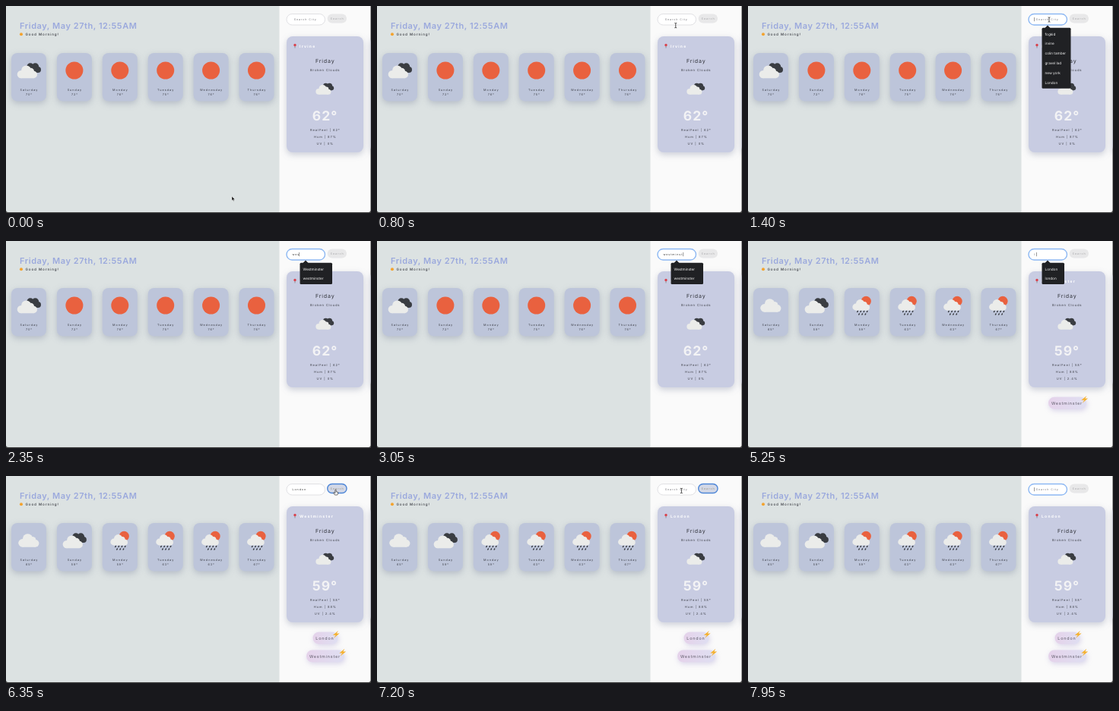
Animation of 480 by 273 pixels, one loop 8000 ms. Source, as an HTML page:

```html
<!DOCTYPE html>
<html lang="en">
<head>
<meta charset="utf-8">
<title>Weather dashboard</title>
<style>
  html, body { margin: 0; width: 100%; height: 100%; overflow: hidden; background: #3a3a3a; }
  svg { display: block; width: 100vw; height: 100vh; font-family: Inter, Arial, sans-serif; white-space: pre; }
  text { text-rendering: geometricPrecision; }
  .card { filter: drop-shadow(0 3px 4.5px rgba(70, 80, 120, .26)); }
  .pill { filter: drop-shadow(1px 2px 3.5px rgba(130, 110, 190, .28)); }
</style>
</head>
<body>
<svg viewBox="0 0 480 273">
  <defs>
    <linearGradient id="pillFill">
      <stop offset="0" stop-color="#e5d2ea"/><stop offset="1" stop-color="#dfdff2"/>
    </linearGradient>
    <clipPath id="window"><path d="M0 0H479.5V269a3 3 0 0 1-3 3H3a3 3 0 0 1-3-3z"/></clipPath>
    <g id="cloud">
      <circle cx="-8.8" cy="3.5" r="5.5"/><circle cx="-1.5" cy="-2" r="7"/>
      <circle cx="5" cy="-.5" r="4.8"/><circle cx="9" cy="4" r="5"/><path d="M-8.8 0H9V9H-8.8z"/>
    </g>
    <g id="sunny"><circle r="11.5" fill="#e9613f"/></g>
    <g id="cloudy"><use href="#cloud" transform="scale(.96)" fill="#ebecea"/></g>
    <g id="broken">
      <g fill="#3a3d42">
        <circle cx="2" cy="-5" r="4.7"/><circle cx="8.5" cy="-5" r="4.7"/>
        <circle cx="12" cy="-1" r="4"/><path d="M2-5H12V3H2z"/>
      </g>
      <use href="#cloud" transform="translate(-2 1.8) scale(.93)" fill="#ebecea"/>
    </g>
    <g id="rain">
      <circle cx="5.5" cy="-5.7" r="6.6" fill="#e9613f"/>
      <use href="#cloud" transform="translate(-1 -.8) scale(.8)" fill="#ebecea"/>
      <path d="M-5.5 7.5l-.5 1m4.7-1l-.5 1m4.7-1l-.5 1m4.7-1l-.5 1M-3.5 11l-.5 1m4.7-1l-.5 1m4.7-1l-.5 1"
        stroke="#33363b" stroke-width="1.5" stroke-linecap="round"/>
    </g>
    <path id="bolt" d="M2.5-4.5L-4 1L-.4.8L-3 4.7L4-1.2L.5-1z" fill="#f6b12c"/>
    <path id="arrow" d="M0 0V5.6L1.3 4.5L2.2 6.5L3.1 6.1L2.3 4.2H4z" fill="#111" stroke="#fff" stroke-width=".4"/>
    <path id="beam" d="M-1.4-3.2Q0-3.2 0-2.4Q0-3.2 1.4-3.2M0-2.4V2.4M-1.4 3.2Q0 3.2 0 2.4Q0 3.2 1.4 3.2"
      fill="none" stroke="#222" stroke-width=".8"/>
    <path id="hand" d="M-.6-3.2q.6-.7 1.2 0V-.8L3-.2Q3.5 2 2.2 3.5H-1L-3 .5q.6-.8 1.5 0l.9.6z"
      fill="#fff" stroke="#111" stroke-width=".6"/>
  </defs>
  <g id="stage" clip-path="url(#window)"></g>
</svg>
<script>
const LOOP = 8000;
const REFOCUS = 7500;
const stage = document.getElementById('stage');
const days = ['Saturday', 'Sunday', 'Monday', 'Tuesday', 'Wednesday', 'Thursday'];
const searches = ['fogkid', 'irvine', 'colin tamber', 'gravel lad', 'new york', 'London'];

const irvine = {
  temp: 62, feel: 62, hum: 87, uv: '0',
  icons: ['broken', 'sunny', 'sunny', 'sunny', 'sunny', 'sunny'], highs: [70, 72, 76, 75, 76, 76]
};
const westminster = {
  temp: 59, feel: 58, hum: 88, uv: '2.4',
  icons: ['cloudy', 'broken', 'rain', 'rain', 'rain', 'rain'], highs: [65, 59, 59, 63, 63, 67]
};

// Pointer path: time, x, y
const pointerPath = [
  [0, 297, 251], [150, 297, 251], [880, 396, 18], [3750, 396, 18], [4000, 408, 15],
  [4350, 408, 15], [4650, 377, 17], [5720, 377, 17], [6120, 433.5, 21.5],
  [6950, 433.5, 21.5], [7400, 377, 18], [LOOP, 377, 18]
];

const text = (x, y, value, size, spacing, fill = '#3b3d45', weight = 400) =>
  `<text x="${x}" y="${y}" font-size="${size}" letter-spacing="${spacing}" fill="${fill}" font-weight="${weight}">${value}</text>`;
const centered = (x, y, value, size, spacing, fill, weight) =>
  text(x + spacing / 2, y, value, size, spacing, fill, weight).replace('<text', '<text text-anchor="middle"');
const rect = (x, y, w, h, r, fill, extra = '') =>
  `<rect x="${x}" y="${y}" width="${w}" height="${h}" rx="${r}" fill="${fill}" ${extra}/>`;
const use = (id, x, y, scale = 1) =>
  `<use href="#${id}" transform="translate(${x} ${y}) scale(${scale})"/>`;
const between = (t, a, b) => t >= a && t < b;

function pointerAt(t) {
  const i = pointerPath.findIndex(p => p[0] > t);
  const [t0, x0, y0] = pointerPath[i - 1], [t1, x1, y1] = pointerPath[i];
  const u = (t - t0) / (t1 - t0), e = u * u * (3 - 2 * u);
  return [x0 + (x1 - x0) * e, y0 + (y1 - y0) * e];
}

function query(t) {
  if (t < 5150) return 'westminster'.slice(0, Math.max(0, Math.floor((t - 2130) / 110) + 1));
  if (t < 5500) return 'lo'.slice(0, t < 5350 ? 1 : 2);
  return t < 6900 ? 'London' : '';
}

function forecast(data) {
  return days.map((day, i) => {
    const x = 7 + i * 59.9, mid = x + 23;
    return rect(x, 62, 46, 63.5, 8, '#bdc5da', 'class="card"') + use(data.icons[i], mid, 85) +
      centered(mid, 112.2, day, 3.8, 1) + centered(mid, 117.7, data.highs[i] + '°', 3.8, .9);
  }).join('');
}

function today(data, city) {
  return rect(369, 40, 101, 153, 8, '#c8cce2', 'class="card"') +
    '<path d="M380 52.5V55.5" stroke="#777" stroke-width=".7"/><circle cx="380" cy="51.5" r="1.7" fill="#d8434e"/>' +
    text(386, 54.6, city, 5, 1.25, '#fff', 700) +
    centered(419.3, 75.2, 'Friday', 7, .85, '#2f3138') +
    centered(419.3, 86.2, 'Broken Clouds', 4.2, .8) +
    use('broken', 419, 109, .76) +
    centered(419, 150.5, data.temp + '°', 17.5, 1, '#f3f3f5', 700) +
    centered(419.3, 164.7, `RealFeel | ${data.feel}°`, 4, .95) +
    centered(419.3, 173.7, `Hum | ${data.hum}%`, 4, .95) +
    centered(419.3, 182.7, `UV | ${data.uv}%`, 4, .95);
}

function pill(name, y, width) {
  return rect(420 - width / 2, y - 8, width, 16, 8, 'url(#pillFill)', 'class="pill"') +
    centered(419, y + 2, name, 5.4, .85, '#5c5866') + use('bolt', 417.7 + width / 2, y - 4.8, 1.1);
}

function searchField(t) {
  const focused = between(t, 1000, 6080) || t >= REFOCUS;
  const value = query(t), selected = between(t, 4650, 5150);
  const caretX = t >= 4000 && t < 5150 ? 376 : 376.5 + value.length * 2.9;
  const blinkStart = t < REFOCUS ? 1000 : REFOCUS;
  const caret = focused && !selected && (between(t, 2130, 3400) || (t - blinkStart) % 1000 < 500);
  return rect(369, 10.5, 50.5, 14.5, 7.25, '#fff',
      focused ? 'stroke="#8db8f3" stroke-width="1.4"' : 'stroke="#d4d4d8" stroke-width=".7"') +
    (selected ? rect(376, 14.5, 32, 6, 0, '#b5d5fb') : '') +
    (value ? text(376.5, 19.2, value, 3.6, .95, '#333') : text(378.7, 19.2, 'Search City', 3.6, .95, '#75757b')) +
    (caret ? rect(caretX, 15, .5, 5.2, 0, '#333') : '');
}

function searchButton(t) {
  const active = between(t, 6080, REFOCUS);
  return rect(422.7, 10.5, 25.3, 12, 6, active ? '#d3d8e6' : '#e8e8e9', active ? 'stroke="#4d86d8" stroke-width="1.4"' : '') +
    centered(435.2, 18, 'Search', 3.7, 1, active ? '#9a917f' : '#a5a5a8');
}

function suggestions(t) {
  if (!between(t, 1150, 5560)) return '';
  const [items, width] = t < 2130 ? [searches, 38]
    : t < 5150 ? [['Westminster', 'westminster'], 42.5] : [['London', 'london'], 29.5];
  return '<path d="M390 29.5L394 25.5L398 29.5z" fill="#202124"/>' +
    rect(386.5, 28.7, width, 2.6 + items.length * 12.9, 1.5, '#202124') +
    items.map((item, i) => text(390.5, 38.6 + i * 12.85, item, 4.7, 0, '#f4f4f4')).join('');
}

function pointer(t) {
  // The pointer hides while the keyboard is in use.
  if (between(t, 2130, 3750) || between(t, 5150, 5720) || t >= REFOCUS) return '';
  const [x, y] = pointerAt(t);
  const overField = between(x, 370, 419) && between(y, 10, 26);
  const overButton = between(x, 423, 448) && between(y, 10, 24);
  return use(overField ? 'beam' : overButton ? 'hand' : 'arrow', x.toFixed(2), y.toFixed(2));
}

function scene(t) {
  const data = t < 3550 ? irvine : westminster;
  const city = t < 3550 ? 'Irvine' : t < 6600 ? 'Westminster' : 'London';
  const pills = t < 3440 ? '' : t < 6250 ? pill('Westminster', 213.7, 50)
    : pill('London', 213.7, 33) + pill('Westminster', 237.5, 50);
  return rect(0, 0, 360, 273, 0, '#dce2e2') + rect(359.5, 0, 121, 273, 0, '#fafafa') +
    text(18, 30, 'Friday, May 27th, 12:55AM', 11, .55, '#9ba9dd', 600) +
    '<circle cx="20" cy="37.2" r="2" fill="#f3a32f"/>' +
    text(25.4, 38.8, 'Good Morning!', 4.6, .9, '#34363d', 500) +
    forecast(data) + today(data, city) + rect(479, 40, 30, 153, 8, '#c8cce2', 'class="card"') +
    pills + searchField(t) + searchButton(t) + suggestions(t) + pointer(t);
}

let shown = '';
function frame() {
  const markup = scene(performance.now() % LOOP);
  if (markup !== shown) stage.innerHTML = shown = markup;
  requestAnimationFrame(frame);
}
frame();
</script>
</body>
</html>
```
